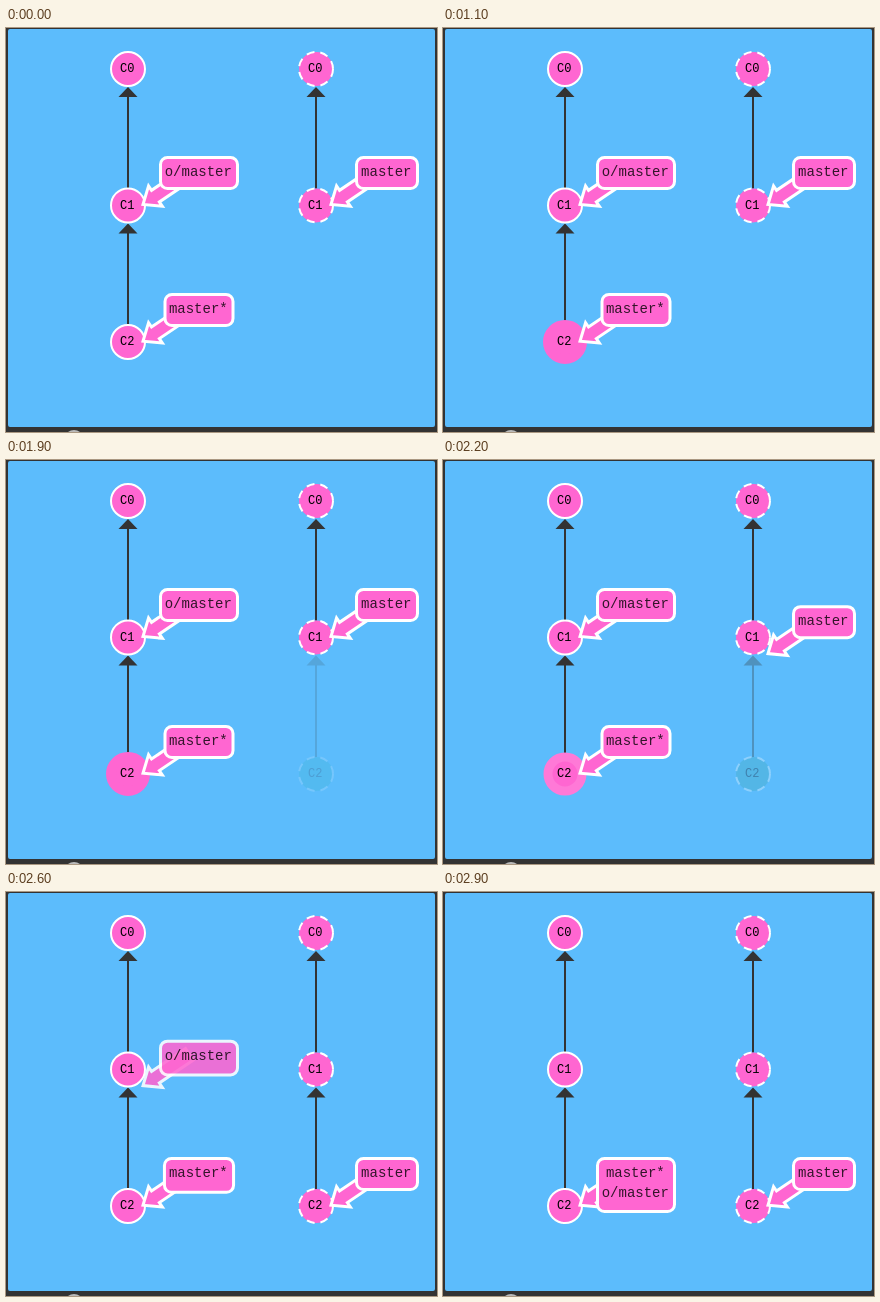
These frames come from a looping animation (431 by 404 pixels, 5100 ms). An HTML page:

```html
<!DOCTYPE html>
<html lang="en">
<head>
<meta charset="utf-8">
<title>Commit graph</title>
<style>
  html, body { margin: 0; width: 100%; height: 100%; overflow: hidden; background: #333; }
  svg { display: block; width: 431px; height: 404px; }
  text { text-anchor: middle; fill: #000; }
  .node text { font: 12px "Liberation Mono", "Courier New", monospace; }
  .tag text { font: 14px "Liberation Mono", "Courier New", monospace; fill-opacity: 0.8; }
  .tag rect, .tag path { fill: #ff66d1; stroke: #fff; stroke-width: 3; }
  .edge line { stroke: #333; stroke-width: 2; }
  .edge path { fill: #333; }
</style>
</head>
<body>
<svg id="stage" viewBox="0 0 431 404">
  <rect x="2" y="1" width="427" height="398" rx="2" fill="#5cbcfc"/>
  <circle cx="68" cy="412" r="10" fill="#bbb"/>
</svg>
<script>
const LOOP = 5100, TICK = 100;
const LEFT = 122, RIGHT = 310, ROWS = [41, 177.4, 314];
const PINK = [255, 102, 209], TEAL = [36, 179, 179], WHITE = [255, 255, 255];
const stage = document.getElementById('stage');

function add(parent, name, attrs = {}, label) {
  const el = document.createElementNS('http://www.w3.org/2000/svg', name);
  set(el, attrs);
  if (label) el.textContent = label;
  return parent.appendChild(el);
}

function set(el, attrs) {
  for (const key in attrs) el.setAttribute(key, attrs[key]);
}

const lerp = (a, b, p) => a + (b - a) * p;
const mix = (a, b, p) => `rgb(${a.map((v, i) => Math.round(lerp(v, b[i], p)))})`;

// Eased progress of a move between two times
function ease(t, from, to) {
  const p = Math.min(1, Math.max(0, (t - from) / (to - from)));
  return p < 0.5 ? 2 * p * p : 1 - 2 * (1 - p) * (1 - p);
}

function edge(x, row) {
  const g = add(stage, 'g', { class: 'edge' });
  const top = ROWS[row] + 18;
  add(g, 'line', { x1: x, x2: x, y1: top + 8, y2: ROWS[row + 1] - 17 });
  add(g, 'path', { d: `M${x} ${top}l9.5 10h-19z` });
  return g;
}

function node(x, row, dashed) {
  const y = ROWS[row];
  const g = add(stage, 'g', { class: 'node' });
  const ring = add(g, 'circle', {
    cx: x, cy: y, r: 17, fill: mix(PINK, PINK, 0), stroke: '#fff', 'stroke-width': 2
  });
  if (dashed) set(ring, { 'stroke-dasharray': '8 6' });
  add(g, 'text', { x: x - 0.8, y: y + 3.4 }, 'C' + row);
  return { g, ring };
}

// Pointer shape with its tip at the origin, aimed right before rotation
const POINTER = 'M0 0L15 -12.3V-7H56V7H15V12.3Z';
const BOX_H = 31, TALL_H = 53;

function tag(x, label, width) {
  const g = add(stage, 'g', { class: 'tag' });
  const arrow = add(g, 'path', { d: POINTER });
  const box = add(g, 'rect', { rx: 7 });
  const text = add(g, 'text', {}, label);
  const cx = x + 71;
  return {
    width,
    place(tipY, textY, w = width, h = BOX_H, alpha = 1) {
      set(arrow, { transform: `translate(${x + 15} ${tipY}) rotate(-34)`, opacity: alpha });
      set(box, { x: cx - w / 2, y: textY - 15.1, width: w, height: h, opacity: alpha });
      set(text, { x: cx - 0.7, y: textY + 3.6 });
    }
  };
}

for (const x of [LEFT, RIGHT]) edge(x, 0);
edge(LEFT, 1);
const newEdge = edge(RIGHT, 1);

for (const x of [LEFT, RIGHT]) {
  node(x, 0, x === RIGHT);
  node(x, 1, x === RIGHT);
}
const pulsing = node(LEFT, 2, false);
const copied = node(RIGHT, 2, true);

const local = tag(LEFT, 'master*', 68);
const remote = tag(RIGHT, 'master', 61);
const tracking = tag(LEFT, 'o/master', 77);

const TIP = [176.5, 313.2], LABEL = [144.6, 281.6], LINE = 20;

function draw(t) {
  const swell = ease(t, 600, 1100) - ease(t, 2100, 2500);
  set(pulsing.ring, { stroke: mix(WHITE, PINK, swell), 'stroke-width': lerp(2, 10, swell) });

  const push = ease(t, 2100, 2500);
  const alpha = lerp(0.2 * ease(t, 1500, 2100), 1, push);
  set(newEdge, { opacity: alpha });
  set(copied.g, { opacity: alpha });
  set(copied.ring, { fill: mix(TEAL, PINK, push) });
  remote.place(lerp(...TIP, push), lerp(...LABEL, push));

  const join = ease(t, 2500, 2900);
  const height = lerp(BOX_H, TALL_H, join);
  local.place(TIP[1], LABEL[1], lerp(local.width, tracking.width, join), height);
  tracking.place(lerp(...TIP, join), lerp(LABEL[0], LABEL[1] + LINE, join),
    tracking.width, height, 1 - join);
}

const start = performance.now();
function frame() {
  const t = (performance.now() - start) % LOOP;
  draw(Math.floor(t / TICK) * TICK);
  requestAnimationFrame(frame);
}
draw(0);
requestAnimationFrame(frame);
</script>
</body>
</html>
```
